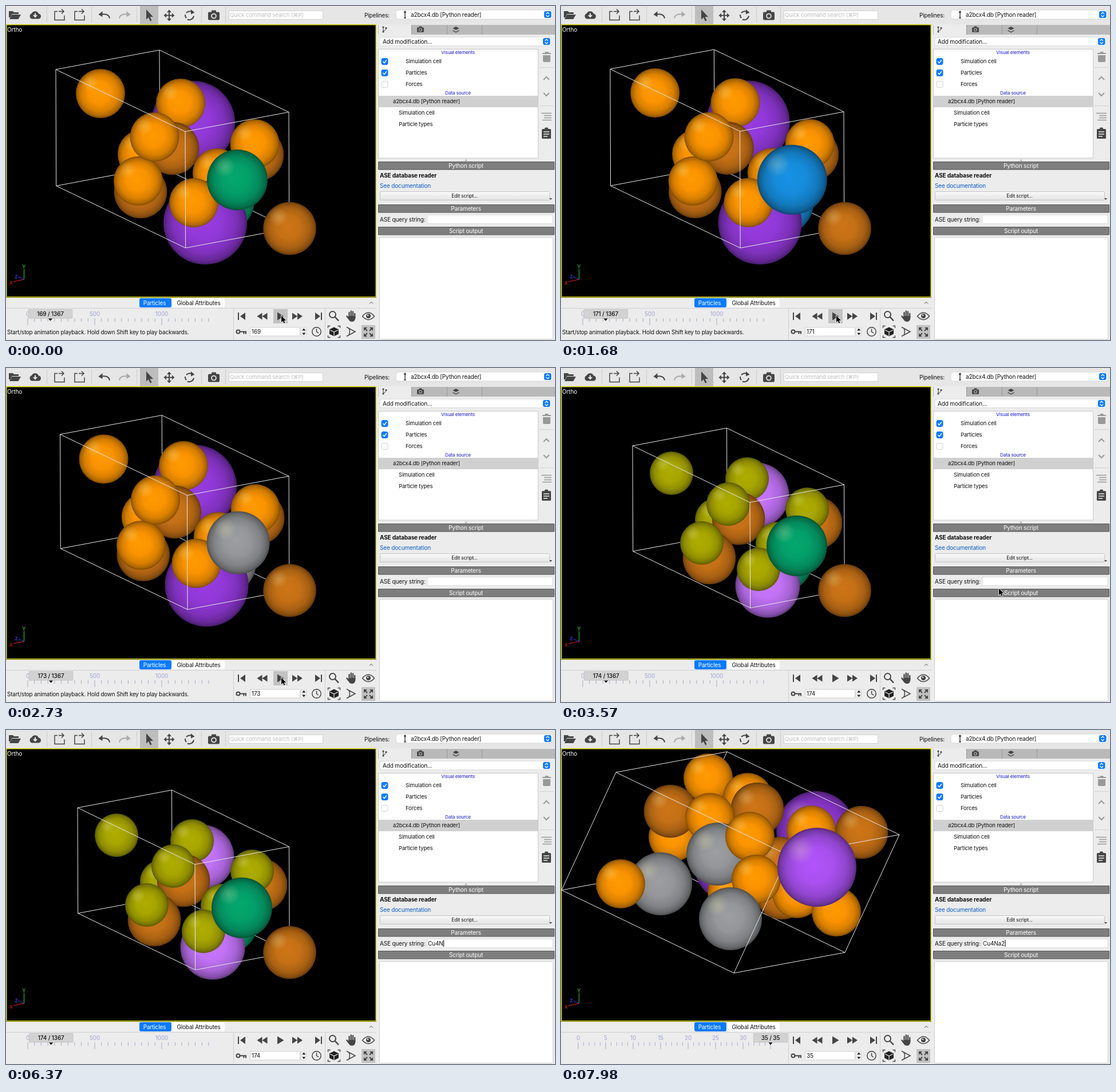
Write an HTML page with a canvas that moves like this. It is 959 by 584 pixels and loops after 8000 ms.

```html
<!DOCTYPE html>
<html lang="en">
<head>
<meta charset="utf-8">
<title>Particle viewer</title>
<style>
html, body { margin: 0; width: 100%; height: 100%; overflow: hidden; background: #ececec; }
canvas { display: block; width: 959px; height: 584px; }
</style>
</head>
<body>
<canvas id="stage" width="959" height="584"></canvas>
<script>
const ctx = document.getElementById('stage').getContext('2d');
const LOOP = 8000;
const INK = '#454545', BG = '#ececec', BLUE = '#0a7aff';

// ---------- drawing helpers ----------
function rect(x, y, w, h, fill, radius = 0, line) {
  ctx.beginPath();
  ctx.roundRect(x, y, w, h, radius);
  if (fill) { ctx.fillStyle = fill; ctx.fill(); }
  if (line) { ctx.strokeStyle = line; ctx.lineWidth = 1; ctx.stroke(); }
}
function fill(d, color = INK) {
  ctx.fillStyle = color;
  ctx.fill(new Path2D(d));
}
function stroke(d, color = INK, width = 1.5) {
  ctx.strokeStyle = color;
  ctx.lineWidth = width;
  ctx.stroke(new Path2D(d));
}
function disc(x, y, r, color) {
  ctx.beginPath();
  ctx.arc(x, y, r, 0, 7);
  ctx.fillStyle = color;
  ctx.fill();
}
function ring(x, y, r, color = INK, width = 1.5) {
  ctx.beginPath();
  ctx.arc(x, y, r, 0, 7);
  ctx.strokeStyle = color;
  ctx.lineWidth = width;
  ctx.stroke();
}
function text(s, x, y, { size = 10, color = '#111', align = 'left', weight = 400 } = {}) {
  ctx.font = `${weight} ${size}px Inter, "Noto Sans", sans-serif`;
  ctx.letterSpacing = '-0.15px';
  ctx.textAlign = align;
  ctx.textBaseline = 'alphabetic';
  ctx.fillStyle = color;
  ctx.fillText(s, x, y + size * 0.36);
}
function dotted(x1, y1, x2, y2) {
  ctx.setLineDash([1, 2]);
  stroke(`M${x1} ${y1}L${x2} ${y2}`, '#9a9a9a', 1);
  ctx.setLineDash([]);
}

// ---------- structures ----------
const COLORS = {
  Se: [255, 150, 0], S: [170, 168, 0], Cu: [200, 114, 22], K: [148, 58, 220], Na: [196, 116, 250],
  Kf: [172, 82, 244], Zr: [4, 162, 108], Hf: [22, 142, 222], Ti: [152, 153, 156]
};
const RADII = { Se: 43, S: 38, Cu: 46.3, K: 73, Na: 56.5, Kf: 69, Zr: 53, Hf: 61, Ti: 55 };

// site, x, y in the first cell, x, y in the small cell, optional shift; back to front
const SITES = [
  ['A', 327, 204, 342, 222],
  ['X', 165, 153, 193, 184],
  ['X', 305, 170, 325, 194, 1, -4],
  ['X', 238, 259, 272, 265],
  ['C', 291, 249, 310, 263],
  ['C', 439, 260, 445, 271],
  ['X', 434.5, 241, 430, 247, 2, 4],
  ['C', 235, 325, 259, 332],
  ['X', 231, 306, 246, 306, 2, 4],
  ['X', 259.5, 229, 292, 238, -5, 0],
  ['B', 381, 341, 387, 337],
  ['X', 369, 292, 378, 307],
  ['A', 348, 379, 361, 380],
  ['X', 328, 344, 345, 352, 1, -4],
  ['B', 404, 304, 412, 311]
];

const LARGE = [
  ['K', 298, 236, 65], ['K', 445, 176, 69], ['Se', 257, 84], ['Se', 326, 118], ['Cu', 343, 138],
  ['Cu', 525, 179], ['Se', 196, 187], ['Cu', 191, 142], ['Se', 260, 153], ['Cu', 383, 233],
  ['Cu', 386, 285], ['Se', 412, 286], ['Se', 437, 175], ['Se', 481, 318], ['Ti', 174, 269],
  ['Se', 104, 269], ['Se', 299, 283], ['Ti', 274, 217], ['Se', 330, 186], ['Se', 341, 261],
  ['Ti', 296, 330], ['Kf', 447, 240]
];

// k blends between the two cell sizes
const STRUCTURES = {
  169: { k: 0, A: 'K', B: 'Zr', X: 'Se' },
  170: { k: -0.01, A: 'K', B: 'Zr', X: 'Se' },
  171: { k: -0.03, A: 'K', B: 'Hf', X: 'Se' },
  172: { k: 0.2, A: 'K', B: 'Ti', X: 'Se', shift: 1 },
  173: { k: 0.2, A: 'K', B: 'Ti', X: 'Se', shift: 1 },
  174: { k: 1, A: 'Na', B: 'Zr', X: 'S' }
};

const mix = (a, b, k) => a + (b - a) * k;

function ball(type, x, y, r = RADII[type]) {
  const c = COLORS[type];
  const tone = f => `rgb(${c.map(v => Math.min(255, v * f)).join()})`;
  let g = ctx.createRadialGradient(x - r * 0.08, y - r * 0.08, 0, x, y, r);
  g.addColorStop(0, tone(1.03));
  g.addColorStop(0.45, tone(0.98));
  g.addColorStop(0.75, tone(0.85));
  g.addColorStop(0.92, tone(0.68));
  g.addColorStop(1, tone(0.5));
  disc(x, y, r, g);
  const hx = x - r * 0.42, hy = y - r * 0.44;
  g = ctx.createRadialGradient(hx, hy, 0, hx, hy, r * 0.36);
  g.addColorStop(0, 'rgba(255,255,190,.24)');
  g.addColorStop(0.5, 'rgba(255,255,190,.13)');
  g.addColorStop(1, 'rgba(255,255,190,0)');
  disc(hx, hy, r * 0.36, g);
}

// near is the closest corner; a, b, c run along the three edges from it
function cellEdges(near, a, b, c, back) {
  const at = (i, j, k) => [0, 1].map(n => near[n] + i * a[n] + j * b[n] + k * c[n]).join(' ');
  const edge = (p, q) => `M${at(...p)}L${at(...q)}`;
  let d = '';
  for (const [p, q] of [[0, 0], [0, 1], [1, 0], [1, 1]]) {
    if ((p && q) !== back) continue;
    d += edge([0, p, q], [1, p, q]) + edge([p, 0, q], [p, 1, q]) + edge([p, q, 0], [p, q, 1]);
  }
  stroke(d, '#e8e8e8', 1);
}
function cell(near, a, b, c, drawAtoms) {
  cellEdges(near, a, b, c, 1);
  drawAtoms();
  cellEdges(near, a, b, c, 0);
}

function smallCell(s) {
  const k = s.k;
  const near = [mix(313, 330, k), mix(219.5, 235, k)];
  const left = [mix(-226, -205, k), mix(-108.5, -99, k)];
  const right = [mix(181, 164.5, k), mix(-34, -31, k)];
  const down = [0.7, mix(203.5, 184.5, k)];
  cell(near, left, right, down, () => {
    for (const [site, x0, y0, x1, y1, dx = 0, dy = 0] of SITES) {
      const on = s.shift || 0;
      ball(site === 'C' ? 'Cu' : s[site], mix(x0, x1, k) + dx * on, mix(y0, y1, k) + dy * on);
    }
  });
  ball('Cu', 495.5, 389);
}
function largeCell() {
  cell([397, 219], [-301, -145], [194, -36], [-95, 206], () => {
    LARGE.slice(0, -1).forEach(p => ball(...p));
  });
  ball(...LARGE.at(-1));
}

function viewport(n) {
  ctx.save();
  ctx.beginPath();
  ctx.rect(0, 32, 647, 478);
  ctx.clip();
  rect(0, 32, 647, 478, '#000');
  if (n === 35) largeCell(); else smallCell(STRUCTURES[n]);
  text('Ortho', 2, 41.5, { color: '#fff' });
  stroke('M31.5 478V460', '#2fd02f', 1);
  stroke('M31.5 478L13 482', '#f02020', 1);
  stroke('M31.5 478L21 473.5', '#3535ff', 1);
  text('Y', 31.3, 456, { size: 9, color: '#35e035', align: 'center' });
  text('x', 9, 483, { size: 10, color: '#f02020', align: 'center' });
  text('z', 18, 472, { size: 10, color: '#4040ff', align: 'center' });
  ctx.restore();
  ctx.strokeStyle = '#d8d800';
  ctx.lineWidth = 1.5;
  ctx.strokeRect(0.75, 32.75, 645.5, 476);
}

// ---------- interface ----------
function stepper(x, y) {
  rect(x, y, 12.5, 12, BLUE, 3);
  stroke(`M${x + 3.5} ${y + 4.8}l2.7-2.6l2.7 2.6M${x + 3.5} ${y + 7.2}l2.7 2.6l2.7-2.6`, '#fff', 1.3);
}
function cameraIcon(x, y, s, hole) {
  rect(x - 10 * s, y - 6 * s, 20 * s, 14 * s, INK, 2 * s);
  rect(x - 4 * s, y - 9 * s, 8 * s, 4 * s, INK, s);
  disc(x, y + s, 4.8 * s, hole);
  disc(x, y + s, 3 * s, INK);
}

function toolbar() {
  rect(0, 0, 959, 32, '#e6e6e6');
  fill('M5 9h7l2 2h8v3H10.500l-3 6H5z');
  fill('M10.500 15h15.500l-4.500 8H6z');
  fill('M45 22.500a5 5 0 0 1 0-9.500a6.500 6.500 0 0 1 12 .5a4.600 4.600 0 0 1 .5 9z');
  stroke('M51 12.500v6M48 16l3 3l3-3', '#e6e6e6', 2);
  for (const x of [71.5, 149.5, 228.5, 341.5, 383.5]) dotted(x, 3, x, 30);
  for (const x of [84, 119]) {
    const d = new Path2D();
    d.addPath(new Path2D('M6 4H1V19H18V11M8 4H17M13 0l4 4l-4 4'), { e: x, f: 5.5 });
    ctx.strokeStyle = INK;
    ctx.lineWidth = 1.5;
    ctx.stroke(d);
  }
  stroke('M181 21.500c-1-7-8-8-14-7', INK, 2);
  fill('M161.500 15l7-6v10z');
  stroke('M198 21.500c1-7 8-8 14-7', '#aaa', 2);
  fill('M217.500 15l-7-6v10z', '#aaa');
  rect(234, 0, 32, 32, '#bdbdbd');
  fill('M245 6v17.500l4-3.500l3 6.500l2.600-1.200l-3-6.300h5.400z');
  stroke('M285 10v13M278.500 16.500h13', INK, 2);
  fill('M285 6.500l4 4.500h-8zM285 26.500l4-4.500h-8zM275.500 16.500l4.500-4v8zM294.500 16.500l-4.500-4v8z');
  stroke('M325 10.500a8 8 0 0 0-10 1.500M313 15a8 8 0 0 0 2 6M317 23.500a8 8 0 0 0 11-6', INK, 2);
  fill('M323 6l6.500 5.500l-6.500 3z');
  cameraIcon(363, 16.5, 1, '#e6e6e6');
  rect(389.5, 8.5, 164, 15, '#fff', 0, '#d2d2d2');
  text('Quick command search (⌘P)', 391, 16, { size: 9.6, color: '#bcbcbc' });
  text('Pipelines:', 626, 16);
  rect(681, 7, 274, 16, '#fff', 4, '#d5d5d5');
  stroke('M697 10v12', INK, 1.5);
  disc(697, 10.5, 2, INK);
  disc(697, 20.5, 1.5, INK);
  text('a2bcx4.db [Python reader]', 707, 15.5);
  stepper(940, 9);
}

function header(y, label) {
  rect(650.5, y + 0.5, 307, 13.5, '#7e7e7e', 0, '#555');
  text(label, 803.5, y + 7.5, { color: '#fff', align: 'center' });
}
function checkbox(y, on) {
  rect(656, y - 5.5, 11, 11, on ? BLUE : '#fff', 2.5, on ? BLUE : '#d0d0d0');
  if (on) stroke(`M658.500 ${y}l2.300 2.600l4-5.400`, '#fff', 1.5);
}

function sidePanel(query, caret) {
  rect(647, 32, 312, 552, BG);
  rect(650, 33, 309, 17, '#b9b9b9');
  rect(651, 33, 57, 17, BG);
  stroke('M708.500 33v17M770.500 33v17M831.500 33v17', '#999', 1);
  stroke('M659 37v8M659 43q5 0 5-4', INK, 1);
  disc(659, 37, 1.6, INK);
  disc(659, 45, 1.6, INK);
  disc(664, 38.5, 1.6, INK);
  cameraIcon(724, 41, 0.6, '#b9b9b9');
  fill('M786 36l5.500 3l-5.500 3l-5.500-3zM780.500 42l5.500 3l5.500-3v1.500l-5.500 3l-5.500-3z');

  rect(653, 54.5, 300, 15, '#fff', 4, '#dcdcdc');
  text('Add modification...', 658, 62);
  stepper(938, 56);

  rect(650.5, 75.5, 279, 190.5, '#fff', 0, '#c8c8c8');
  rect(651, 157, 278, 20, '#d0d0d0');
  const head = { size: 8.2, color: '#1818d0', align: 'center' }, row = { size: 9.5 };
  text('Visual elements', 789.5, 81.5, head);
  text('Data source', 789.5, 152, head);
  ['Simulation cell', 'Particles', 'Forces'].forEach((s, i) => {
    checkbox(97 + 20 * i, i < 2);
    text(s, 698, 97 + 20 * i, row);
  });
  text('a2bcx4.db [Python reader]', 676, 167, row);
  text('Simulation cell', 686, 187, row);
  text('Particle types', 686, 207, row);

  fill('M937 82h4l1-2h5l1 2h4v2h-15zM938 86h13v10q0 2-2 2h-9q-2 0-2-2z', '#999');
  dotted(933, 107.5, 957, 107.5);
  stroke('M939 129l5-5l5 5M939 152l5 5l5-5', '#999', 2);
  dotted(933, 174.5, 957, 174.5);
  stroke('M935 187.500h18M940 191.500h13M940 195.500h13M937 199.500h16', '#999', 1.5);
  rect(936, 215, 16, 17, INK, 1.5);
  rect(941, 212.5, 6, 4, INK, 1.5);
  stroke('M939 220h10M939 224h10M939 228h7', BG, 1.5);
  disc(803.5, 270, 2, '#c0c0c0');

  header(272, 'Python script');
  text('ASE database reader', 653, 296, { weight: 700 });
  text('See documentation', 653, 314, { color: '#0a5cc8' });
  const g = ctx.createLinearGradient(0, 324, 0, 340);
  g.addColorStop(0, '#fafafa');
  g.addColorStop(1, '#e2e2e2');
  rect(653.5, 324.5, 296, 15, g, 1, '#c4c4c4');
  text('Edit script...', 801, 332, { size: 8.5, align: 'center' });
  fill('M949 336h5l-2.500 3z');

  header(347, 'Parameters');
  text('ASE query string:', 653, 373);
  rect(736, 365.5, 219, 15, '#fff', 0, '#dedede');
  text(query, 737, 373);
  if (caret) {
    const w = query ? ctx.measureText(query).width : 0;
    rect(737.5 + w, 367, 1, 12, '#000');
  }
  header(386, 'Script output');
  rect(652.5, 404.5, 303, 178, '#fff', 1, '#cfcfcf');
}

function timeline(n) {
  const long = n !== 35;
  const [x0, px, tick, major, last, half] = long
    ? [38, 0.234, 50, 500, 1367, 38.3]
    : [30, 9.6, 1, 5, 35, 29.6];
  for (let i = 0; i <= last; i += tick) {
    const big = i % major === 0, x = x0 + i * px;
    rect(x - 0.5, 546, 1, big ? 12 : 6, '#a8a8c8');
    if (big) text(String(i), x, 538, { color: '#a2a2d2', align: 'center' });
  }
  const x = x0 + n * px;
  rect(x - half, 530.5, half * 2, 15.5, '#d2d2d2', 0, '#c4c4c4');
  text(`${n} / ${last}`, x, 538.5, { align: 'center', weight: 500 });
  fill(`M${x - 3.5} 546.500h7l-3.500 4z`, '#000');
}

function bottomBar(n, hover) {
  rect(0, 510, 647, 74, BG);
  rect(233, 511, 56, 16, BLUE, 3);
  rect(289, 511, 93, 16, '#fff', 3);
  text('Particles', 259.5, 519, { color: '#fff', align: 'center' });
  text('Global Attributes', 336.5, 519, { align: 'center' });
  stroke('M635 520.500l3-3l3 3', INK, 1);
  stroke('M0 528.500H647M397.500 529V584M557.500 529V584', '#cfcfcf', 1);
  timeline(n);
  if (hover) {
    text('Start/stop animation playback. Hold down Shift key to play backwards.', 2, 570, { size: 9.85 });
    rect(467, 530, 25, 25, '#c2c2c2');
  }
  fill('M405 536h2v13h-2zM418 536v13l-9-6.500z');
  fill('M447.500 536.500v12l-9-6zM456.500 536.500v12l-9-6z');
  fill('M474 535.500v14l11.500-7z');
  fill('M500 536.500v12l9-6zM509 536.500v12l9-6z');
  fill('M540 536v13l9-6.500zM550 536h2v13h-2z');

  ring(570.5, 539.5, 5.5, INK, 2);
  stroke('M574.500 543.500l6.500 7', INK, 2.500);
  ctx.lineCap = 'round';
  stroke('M599.500 544v-8M602.800 543v-9.500M606 543v-8.500M609.200 545v-7', INK, 2.300);
  stroke('M599 547l-3.500-4.500', INK, 2.500);
  ctx.lineCap = 'butt';
  fill('M598.300 542h12v4q-1 6-6 6q-4 0-6-4z');
  stroke('M622.500 542.500q10.500-13 21 0q-10.500 12-21 0z', INK, 1.500);
  disc(633, 542, 4, INK);
  disc(632, 540.8, 1.3, BG);

  ring(405.5, 569.5, 3, INK, 2);
  stroke('M408.500 569.500H420M415.500 569.500v4M419 569.500v4', INK, 2);
  rect(426.5, 562, 87, 15, '#fff', 0, '#d0d0d0');
  text(String(n), 429, 569.5);
  rect(515.5, 562, 9, 15, '#fff', 3, '#d0d0d0');
  fill('M517 567.500h6.500l-3.200-4zM517 571.500h6.500l-3.200 4z', '#222');
  ring(542.5, 569.5, 7.7);
  stroke('M542.500 564.500v5l3.500 2.500');
  fill('M573 561.500l8 4v8l-8 4l-8-4v-8z', '#222');
  stroke('M566 566.500l7 3.500l7-3.500M573 570v7', BG, 1.2);
  stroke('M562.500 563v-3.500h4M579.500 559.500h4v3.500M562.500 576v3.500h4M579.500 579.500h4v-3.500', INK, 1.300);
  stroke('M595 561.500l15 8l-15 8M599 564q3 5 0 11', INK, 1.500);
  rect(621, 558, 24, 24, '#c2c2c2');
  fill('M625 562h6l-6 6zM641 562h-6l6 6zM625 578h6l-6-6zM641 578h-6l6-6z');
  stroke('M627 564l4 4M639 564l-4 4M627 576l4-4M639 576l-4-4', INK, 1.800);
}

// ---------- timing ----------
const FRAMES = [[0, 169], [560, 170], [1190, 171], [1750, 172], [2310, 173], [2870, 174], [7770, 35]];
const KEYS = [[4900, 'C'], [5320, 'u'], [6020, '4'], [6300, 'N'], [6580, 'a'], [7000, '2']];

function ease(t, from, to) {
  const u = Math.min(1, Math.max(0, (t - from) / (to - from)));
  return u * u * (3 - 2 * u);
}
function pointer(t) {
  const a = ease(t, 2940, 3450), b = ease(t, 3640, 3920);
  return [mix(mix(481, 765, a), 762, b), mix(mix(541.5, 385.5, a), 373, b)];
}
function drawPointer(x, y) {
  if (x > 736 && y < 381) {
    stroke(`M${x - 2.5} ${y - 6.5}q2.500 0 2.500 2v9q0 2-2.500 2M${x + 2.5} ${y - 6.5}q-2.500 0-2.500 2v9q0 2 2.500 2`, '#222', 1);
    return;
  }
  const d = `M${x} ${y}v11.500l2.700-2.300l1.900 4.100l1.900-.8l-1.900-4h3.600z`;
  stroke(d, '#fff', 1.5);
  fill(d, '#000');
}

function draw(t) {
  const n = FRAMES.findLast(f => t >= f[0])[1];
  const query = KEYS.filter(k => t >= k[0]).map(k => k[1]).join('');
  const [mx, my] = pointer(t);
  ctx.clearRect(0, 0, 959, 584);
  toolbar();
  sidePanel(query, t >= 4200);
  bottomBar(n, mx < 492);
  viewport(n);
  if (!query) drawPointer(mx, my);
}

function tick() {
  draw(performance.now() % LOOP);
  requestAnimationFrame(tick);
}
tick();
</script>
</body>
</html>
```
